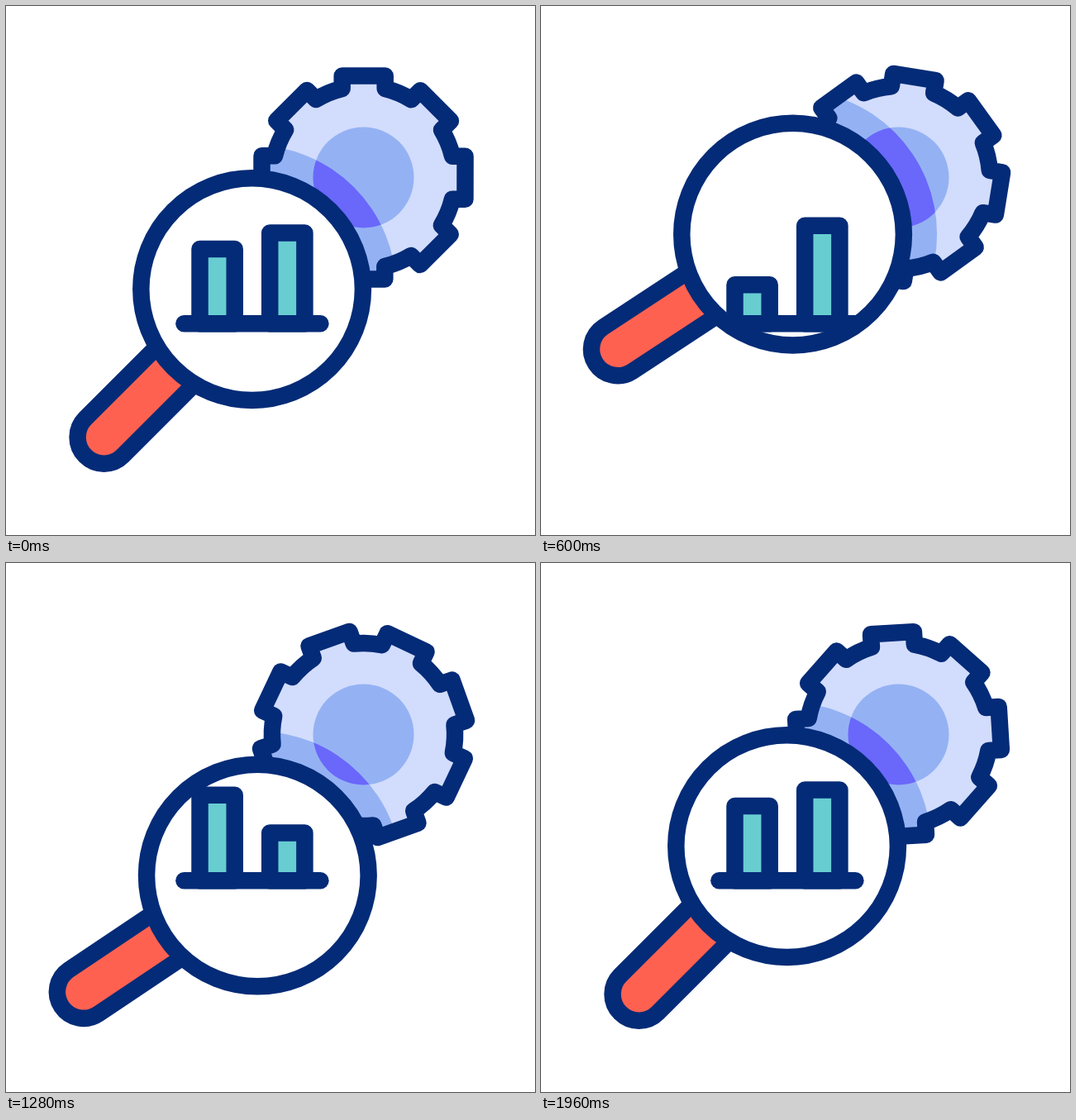
Write an HTML page with a canvas that moves like this. It is 640 px wide and 640 px high and loops after 2000 ms.

```html
<!DOCTYPE html>
<html lang="en">
<head>
<meta charset="utf-8">
<title>Magnifier, chart and gear</title>
<style>
  html, body { margin: 0; width: 100%; height: 100%; overflow: hidden; background: #fff; }
  canvas { display: block; width: 640px; height: 640px; }
</style>
</head>
<body>
<canvas id="stage"></canvas>
<script>
const LOOP = 2000, TAU = Math.PI * 2, RAD = Math.PI / 180;
const NAVY = '#042b77', PALE = '#d2dcfd', BLUE = '#94b2f3',
      VIOLET = '#6a67fb', TEAL = '#67cdd1', RED = '#ff6151';
const LINE = 20.5;
const GEAR = { x: 432.5, y: 207.5, teeth: 8, half: 26, foot: 107.5, tip: 123, hub: 61 };
const PIVOT = { x: 259.2, y: 381 };
const LENS = { x: 38.4, y: -38.4, r: 134.3, shade: 174.5 };
const GRIP = { start: 128, end: 253.2, r: 32 };
const BASE = 384.3;

// Each key: time, value, then optional ease handles for the stretch leading to it.
const LIFT = [[120, 0], [880, -108], [1480, 74], [1920, 0]];
const TILT = [[120, 0], [880, 20, 0, 0.75], [1480, 9, 0.25, 1], [1920, 0]];
const BAR_A = [[120, 294], [700, 341], [1470, 270], [1920, 294]];
const BAR_B = [[120, 274.5], [690, 265.1], [1390, 330.8], [1480, 330.8], [1920, 274.5]];

const canvas = document.getElementById('stage');
const ctx = canvas.getContext('2d');
const dpr = window.devicePixelRatio || 1;
canvas.width = canvas.height = Math.round(640 * dpr);

function valueAt(keys, t) {
  if (t <= keys[0][0]) return keys[0][1];
  for (let i = 1; i < keys.length; i++) {
    const [t0, v0] = keys[i - 1];
    const [t1, v1, a = 0, b = 1] = keys[i];
    if (t > t1) continue;
    const u = (t - t0) / (t1 - t0), w = 1 - u;
    return v0 + (v1 - v0) * (3 * w * w * u * a + 3 * w * u * u * b + u * u * u);
  }
  return keys[keys.length - 1][1];
}

function disc(x, y, r, color) {
  ctx.beginPath();
  ctx.arc(x, y, r, 0, TAU);
  ctx.fillStyle = color;
  ctx.fill();
}

function gearPath(turn) {
  const { teeth, half, foot, tip } = GEAR;
  const root = Math.hypot(half, foot), spread = Math.atan2(half, foot);
  const path = new Path2D();
  for (let i = 0; i < teeth; i++) {
    const a = turn + i * TAU / teeth - Math.PI / 2;
    const c = Math.cos(a), s = Math.sin(a);
    const to = (along, side) => path.lineTo(
      GEAR.x + along * c - side * s, GEAR.y + along * s + side * c);
    to(foot, -half);
    to(tip, -half);
    to(tip, half);
    to(foot, half);
    path.arc(GEAR.x, GEAR.y, root, a + spread, a + TAU / teeth - spread);
  }
  path.closePath();
  return path;
}

function drawGear(turn, lens) {
  const path = gearPath(turn);
  ctx.fillStyle = PALE;
  ctx.fill(path);
  ctx.save();
  ctx.clip(path);
  disc(GEAR.x, GEAR.y, GEAR.hub, BLUE);
  disc(lens.x, lens.y, LENS.shade, BLUE);
  // The hub darkens where the shade falls on it.
  ctx.beginPath();
  ctx.arc(lens.x, lens.y, LENS.shade, 0, TAU);
  ctx.clip();
  disc(GEAR.x, GEAR.y, GEAR.hub, VIOLET);
  ctx.restore();
  ctx.stroke(path);
}

function drawGrip(lens, tilt) {
  ctx.save();
  ctx.translate(lens.x, lens.y);
  ctx.rotate(tilt + 135 * RAD);
  ctx.beginPath();
  ctx.moveTo(GRIP.start, -GRIP.r);
  ctx.arc(GRIP.end, 0, GRIP.r, -Math.PI / 2, Math.PI / 2);
  ctx.lineTo(GRIP.start, GRIP.r);
  ctx.fillStyle = RED;
  ctx.fill();
  ctx.stroke();
  ctx.restore();
}

function drawBar(x, top) {
  ctx.beginPath();
  ctx.rect(x, top, 42.2, BASE - top);
  ctx.fillStyle = TEAL;
  ctx.fill();
  ctx.stroke();
}

function drawLens(lens, t) {
  disc(lens.x, lens.y, LENS.r, '#fff');
  ctx.save();
  ctx.beginPath();
  ctx.arc(lens.x, lens.y, LENS.r, 0, TAU);
  ctx.clip();
  drawBar(234.5, valueAt(BAR_A, t));
  drawBar(319.2, valueAt(BAR_B, t));
  ctx.beginPath();
  ctx.moveTo(215.4, BASE);
  ctx.lineTo(380.4, BASE);
  ctx.stroke();
  ctx.restore();
  ctx.beginPath();
  ctx.arc(lens.x, lens.y, LENS.r, 0, TAU);
  ctx.stroke();
}

function draw(t) {
  const tilt = valueAt(TILT, t) * RAD;
  const c = Math.cos(tilt), s = Math.sin(tilt);
  const lens = {
    x: PIVOT.x + LENS.x * c - LENS.y * s,
    y: PIVOT.y + valueAt(LIFT, t) + LENS.x * s + LENS.y * c
  };
  ctx.setTransform(dpr, 0, 0, dpr, 0, 0);
  ctx.fillStyle = '#fff';
  ctx.fillRect(0, 0, 640, 640);
  ctx.strokeStyle = NAVY;
  ctx.lineWidth = LINE;
  ctx.lineJoin = ctx.lineCap = 'round';
  drawGear(Math.PI * t / LOOP, lens);
  drawGrip(lens, tilt);
  drawLens(lens, t);
}

const began = performance.now();
function tick() {
  draw((performance.now() - began) % LOOP);
  requestAnimationFrame(tick);
}
tick();
</script>
</body>
</html>
```
